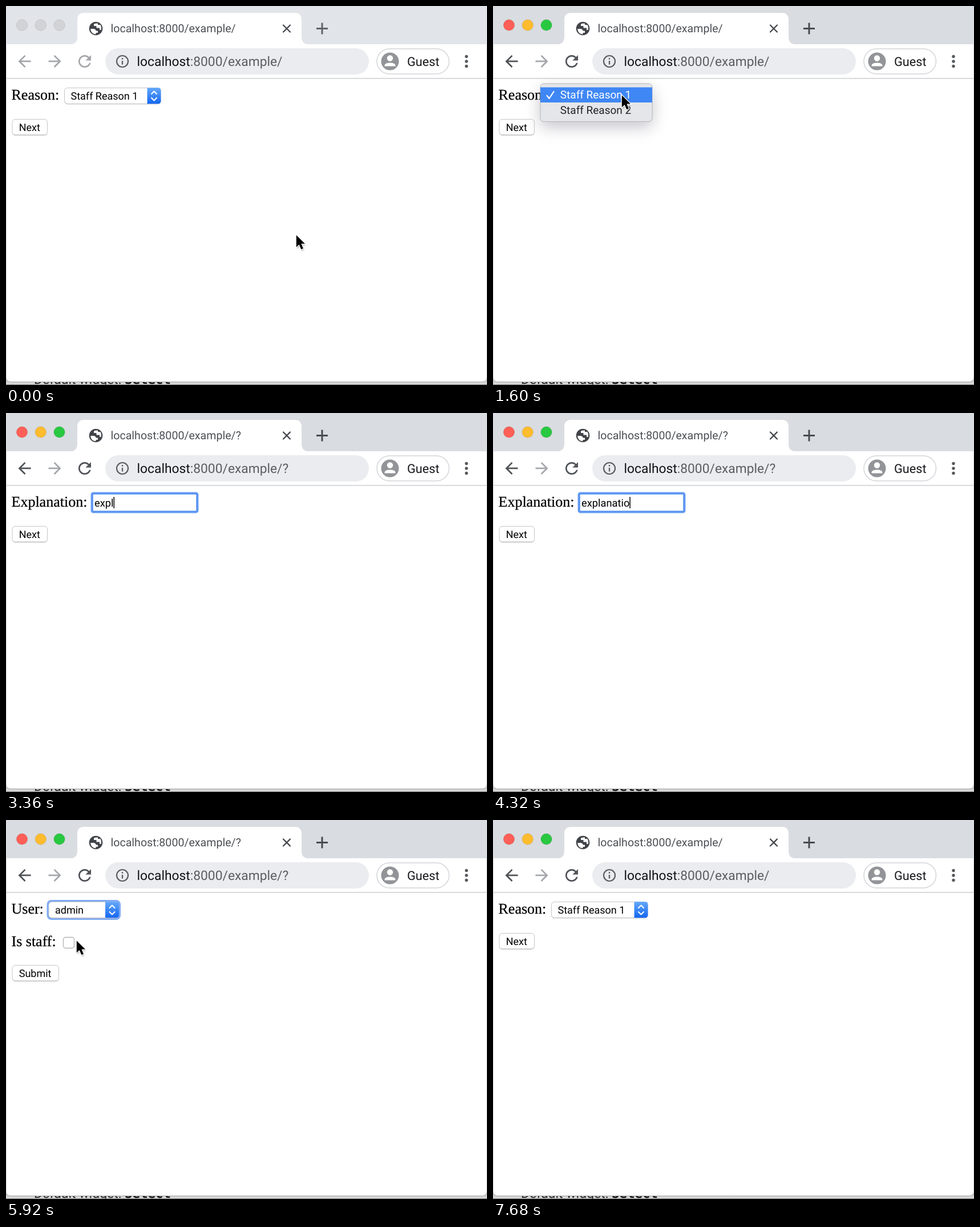
Write an HTML page that moves like this. It is 843x664 px and loops after 7.84 s.

```html
<!DOCTYPE html>
<html lang="en">
<head>
<meta charset="utf-8">
<title>Form wizard</title>
<style>
html, body { margin: 0; width: 100%; height: 100%; overflow: hidden; background: #fff; }
svg { display: block; }
text { font-family: Roboto, sans-serif; white-space: pre; text-rendering: geometricPrecision; }
.label { font: 26px "Liberation Serif", serif; stroke: #000; stroke-width: .25; }
.ui { font-size: 18px; }
.item { font-size: 19px; }
.dash { font-family: Inter, sans-serif; font-size: 17.5px; }
.line { fill: none; stroke-linecap: round; stroke-linejoin: round; }
</style>
</head>
<body>
<svg width="843" height="664" viewBox="0 0 843 664">
  <defs>
    <linearGradient id="blue" x1="0" y1="0" x2="0" y2="1">
      <stop offset="0" stop-color="#64a8fa"/><stop offset="1" stop-color="#1467f2"/>
    </linearGradient>
    <linearGradient id="under" x1="0" y1="0" x2="0" y2="1">
      <stop offset="0" stop-color="#b8b8b8"/><stop offset="1" stop-color="#dedede"/>
    </linearGradient>
    <filter id="glow" x="-40%" y="-90%" width="180%" height="300%"><feGaussianBlur stdDeviation="14"/></filter>
    <filter id="soft" x="-50%" y="-50%" width="200%" height="200%"><feGaussianBlur stdDeviation="1.5"/></filter>
  </defs>

  <rect y="650" width="843" height="14" fill="url(#under)"/>
  <text x="49" y="662" font-size="23" fill="#222">Default widget:</text>
  <text x="208" y="662" fill="#111" style="font:bold 22.4px 'DejaVu Sans Mono',monospace">Select</text>
  <rect y="663" width="843" height="1" fill="#777"/>
  <path d="M0 0H843V650Q843 658.500 834 658.500H9Q0 658.500 0 650Z" fill="#fff" stroke="#aaa"/>

  <rect id="strip" width="843" height="67"/>
  <path d="M112 67.500Q125 67 125 54V24Q125 12 137 12H506Q518 12 518 24V54Q518 67 531 67.500Z" fill="#fff"/>
  <g id="lights"></g>
  <circle cx="157.500" cy="39.500" r="11.800" fill="#404347"/>
  <path fill="#fff" d="M148 40H153Q157.500 40 157.500 43.500H161V47H157.500V49.500Q149 49 148 40ZM154 35V31.500Q157.500 30 161 30.500V33H165.500Q167.800 37 167 42H164V38.500H158.500V35Z"/>
  <text id="tab" x="183.500" y="46" font-size="19.600" fill="#4c4f54"></text>
  <path class="line" d="M486 33.500l12 12m0-12l-12 12" stroke="#45484c" stroke-width="2.300"/>
  <path id="plus" d="M544 39.500h20m-10-10v20" stroke-width="3"/>

  <path id="back" transform="translate(16 80.400) scale(1.380)" d="M20 11H7.830l5.590-5.590L12 4l-8 8 8 8 1.410-1.410L7.830 13H20z"/>
  <path transform="translate(69 80.400) scale(1.380)" fill="#a5a7aa" d="M12 4l-1.410 1.410L16.170 11H4v2h12.170l-5.580 5.590L12 20l8-8z"/>
  <path id="reload" transform="translate(121.400 80.400) scale(1.380)" d="M17.650 6.350C16.200 4.900 14.210 4 12 4c-4.420 0-7.990 3.580-7.990 8s3.570 8 7.990 8c3.730 0 6.840-2.550 7.730-6h-2.080c-.820 2.330-3.040 4-5.650 4-3.310 0-6-2.690-6-6s2.690-6 6-6c1.660 0 3.140.690 4.220 1.780L13 11h7V4z"/>
  <rect x="174" y="74" width="462" height="46" rx="23" fill="#ebecef"/>
  <circle cx="204" cy="97" r="10" fill="none" stroke="#5a5d61" stroke-width="2.200"/>
  <path d="M204 91v2.500m0 2.500v6.500" stroke="#5a5d61" stroke-width="2.300"/>
  <text x="229.500" y="105" font-size="22.800" fill="#5a5d62"><tspan fill="#111215">localhost</tspan><tspan id="path"></tspan></text>
  <rect x="650" y="75" width="126.500" height="44" rx="22" fill="#fff" stroke="#d3d5d9" stroke-width="1.500"/>
  <circle cx="673" cy="97" r="15.500" fill="#929498"/>
  <circle cx="673" cy="91.500" r="5.200" fill="#fff"/>
  <path d="M663.500 105.500V104Q664 99.500 673 99.500T682.500 104V105.500Z" fill="#fff"/>
  <text x="703" y="105" font-size="21.700" fill="#17181b">Guest</text>
  <g fill="#55585c"><circle cx="807" cy="88.500" r="2.700"/><circle cx="807" cy="97" r="2.700"/><circle cx="807" cy="105.500" r="2.700"/></g>
  <rect y="126" width="843" height="1.700" fill="#d3d4d6"/>

  <g id="page"></g>
  <g id="pointer"></g>
</svg>
<script>
const STEP = 160, STEPS = 49;
const $ = id => document.getElementById(id);

// Steps at which things happen
const ACTIVE = 3, REASON_OPEN = 8, REASON_SET = 11, EXPLAIN = 15, FOCUS = 17,
      USER = 30, USER_OPEN = 33, USER_SET = 35, CHECKED = 39, RESET = 42, GONE = 45;

// Pointer stops: step, x, y
const ROUTE = [
  [0, 508, 400], [3, 508, 400], [8, 225, 155], [11, 225, 155], [13, 46, 206],
  [15, 216.5, 145], [17, 216.5, 150], [30, 208, 148], [32, 168, 152], [33, 168, 152],
  [34, 158, 174], [35, 156, 176], [37, 123, 210], [38, 110, 212], [39, 110, 212],
  [41, 50, 264], [42, 50, 264], [45, 420, 670]
];

const text = (x, y, s, cls = 'ui', fill = '#000') =>
  `<text x="${x}" y="${y}" class="${cls}" fill="${fill}">${s}</text>`;

const box = (x, y, w, h, r, fill, stroke = 'none', sw = 1) =>
  `<rect x="${x}" y="${y}" width="${w}" height="${h}" rx="${r}" fill="${fill}" stroke="${stroke}" stroke-width="${sw}"/>`;

const line = (d, color, w) => `<path class="line" d="${d}" stroke="${color}" stroke-width="${w}"/>`;

const raised = (x, y, w, h) =>
  box(x + .5, y + 1.2, w - 1, h - 1, 5, '#b5b5b5') + box(x + .5, y + .5, w - 1, h - 1.2, 5, '#fff', '#c6c6c6');

const button = (y, w, s) => raised(10.5, y, w, 28.5) + text(22.7, y + 21.3, s);

function select(x, w, value, focused) {
  const r = x + w, mid = r - 12;
  return (focused ? box(x - 1, 142, w + 2, 31, 6, '#fff', '#7faaf6', 4) : '') +
    raised(x, 143, w, 29) +
    `<path d="M${r - 24} 143.300h19q5 0 5 5v18q0 5-5 5h-19z" fill="url(#blue)"/>` +
    line(`M${mid - 4.5} 154l4.500-4.500 4.500 4.500m-9 7l4.500 4.500 4.500-4.500`, '#fff', 2) +
    text(x + 11.5, 164, value, value[0] === '-' ? 'dash' : 'ui');
}

function menu(x, w, items, hover) {
  const rows = items.map((s, i) => {
    const on = i === hover;
    return (on ? box(x, 142.5 + i * 26.5, w, 26.5, 0, '#3f87f5') : '') +
      text(x + 34.8, 162 + i * 26.5, s, s[0] === '-' ? 'dash' : 'item', on ? '#fff' : '#232528');
  });
  return `<g opacity=".34" filter="url(#glow)">${box(x, 146, w, 66, 6, '#556')}</g>` +
    box(x, 136, w, 66.5, 6, '#e4e6e9', '#b4b6b9') + rows.join('') +
    line(`M${x + 11.5} 157l4 5 8-12`, hover ? '#232528' : '#fff', 2.2);
}

function reasonPage(n) {
  const open = n >= REASON_OPEN && n < REASON_SET;
  const focused = n >= REASON_SET && n < EXPLAIN;
  return text(9.5, 164, 'Reason:', 'label') + select(102, 169.5, 'Staff Reason 1', focused) +
    button(198, 62.5, 'Next') +
    (open ? menu(83, 196, ['Staff Reason 1', 'Staff Reason 2'], 0) : '');
}

function explainPage(n) {
  const typed = 'explanation'.slice(0, Math.max(0, n - FOCUS));
  const s = text(9.5, 164, 'Explanation:', 'label') + button(198, 62.5, 'Next');
  if (n < FOCUS) return s + box(152, 142.5, 181.5, 28.5, 0, '#fff', '#bcbcbc', 1.4);
  return s + box(151, 141, 184, 32, 2, '#fff', '#a9c8fa', 5.5) +
    box(151, 141, 184, 32, 2, '#fff', '#5b95f2', 3.6) +
    `<text id="typed" x="155" y="164" font-size="18.300">${typed}</text>` +
    '<rect id="caret" y="147" width="1.500" height="20"/>';
}

function userPage(n) {
  const chosen = n >= USER_SET, checked = n >= CHECKED;
  let s = text(9.5, 164, 'User:', 'label') +
    select(74.5, 123.5, chosen ? 'admin' : '---------', chosen && !checked) +
    text(9.5, 221, 'Is staff:', 'label') +
    box(100.5, 205.5, 19, 19, 4, checked ? 'url(#blue)' : '#fff', checked ? '#2a76ee' : '#b4b4b4', 1.4) +
    button(254, 82.5, 'Submit');
  if (checked) s += line('M105 215.500l3.500 4.500 7-10', '#fff', 2.3);
  if (n >= USER_OPEN && !chosen) s += menu(56, 150, ['---------', 'admin'], n - USER_OPEN);
  return s;
}

function pointer(n) {
  if (n > FOCUS && n < USER || n >= GONE) return '';
  const i = ROUTE.findIndex((p, k) => k && p[0] >= n);
  const [a, x, y] = ROUTE[i - 1], [b, u, v] = ROUTE[i];
  const k = (n - a) / (b - a);
  const at = `<g transform="translate(${x + (u - x) * k} ${y + (v - y) * k})">`;
  if (n >= EXPLAIN && n <= FOCUS) {
    const beam = 'M-5-13q5 0 5 3.500q0-3.500 5-3.500M0-10v20M-5 13q5 0 5-3.500q0 3.500 5 3.500M-2.500 2h5';
    return at + line(beam, '#fff', 4) + line(beam, '#111', 1.8) + '</g>';
  }
  const arrow = 'M.800 1.500V22.500L5.700 18L9.300 26.300L13 24.700L9.400 16.600H16Z';
  return at + `<path d="${arrow}" transform="translate(1 2.500)" opacity=".4" filter="url(#soft)"/>` +
    `<path d="${arrow}" stroke="#fff" stroke-width="2.600" paint-order="stroke"/></g>`;
}

function draw(n) {
  const active = n >= ACTIVE;
  const path = ':8000/example/' + (n >= EXPLAIN && n < RESET ? '?' : '');
  $('strip').setAttribute('fill', active ? '#d9dce0' : '#e1e4e9');
  $('lights').innerHTML = ['#fe5f57', '#febc2e', '#28c840'].map((c, i) =>
    `<circle cx="${28 + i * 32.75}" cy="33.500" r="9.700" fill="${active ? c : '#d2d3d6'}" stroke="#000" stroke-opacity=".1"/>`).join('');
  $('plus').setAttribute('stroke', active ? '#484b50' : '#606367');
  for (const id of ['back', 'reload']) $(id).setAttribute('fill', active ? '#505357' : '#a5a7aa');
  $('tab').textContent = 'localhost' + path;
  $('path').textContent = path;
  const page = n < EXPLAIN || n >= RESET ? reasonPage : n < USER ? explainPage : userPage;
  $('page').innerHTML = page(n);
  const caret = $('caret');
  if (caret) caret.setAttribute('x', 155 + $('typed').getComputedTextLength());
  $('pointer').innerHTML = pointer(n);
}

let last = -1;
function tick() {
  const n = Math.floor(performance.now() / STEP) % STEPS;
  if (n !== last) draw(last = n);
  requestAnimationFrame(tick);
}
tick();
</script>
</body>
</html>
```
